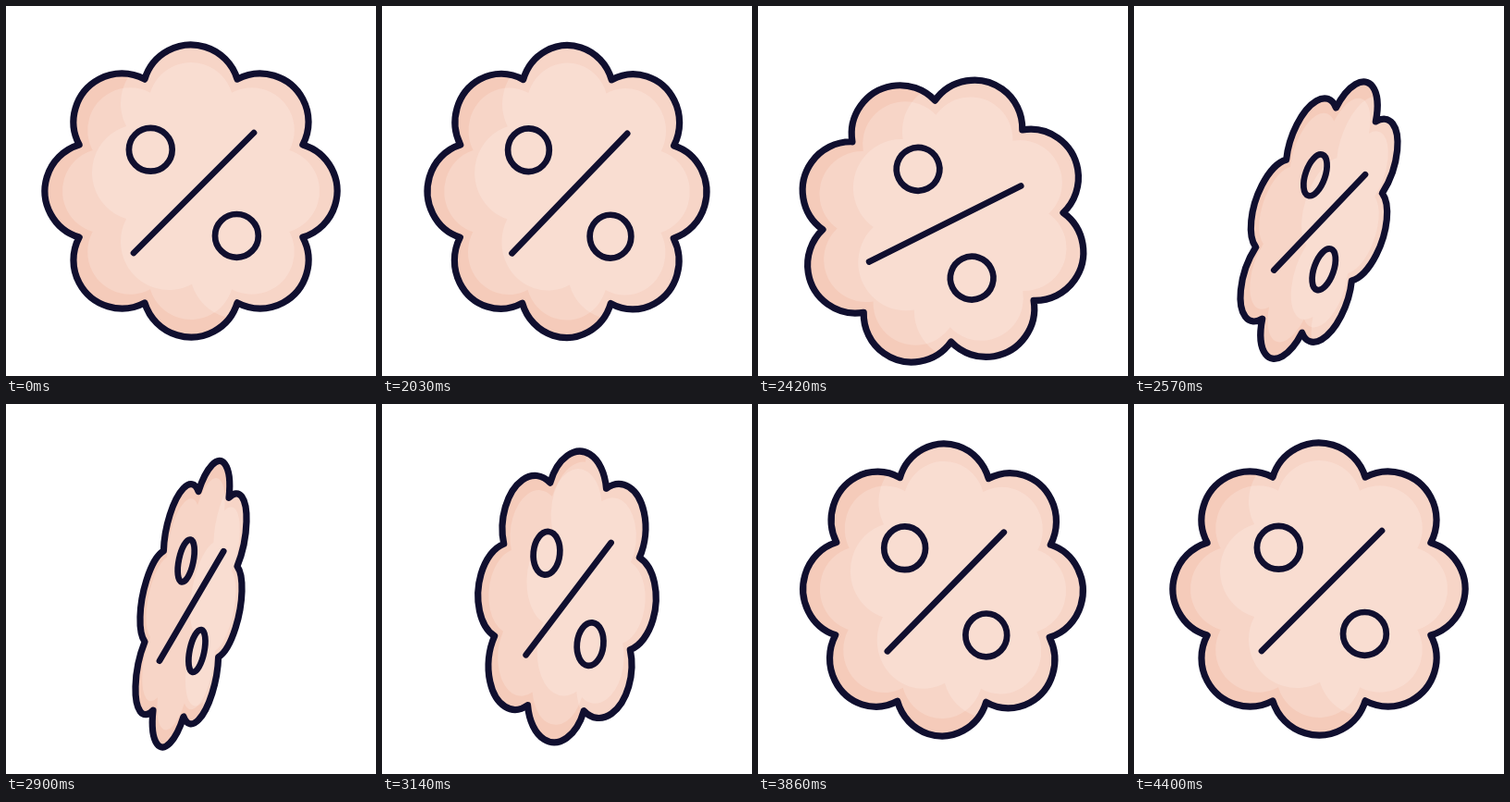
An HTML page with a canvas that plays this animation: 400x400 px, repeating every 4.43 s.

```html
<!DOCTYPE html>
<html lang="en">
<head>
<meta charset="utf-8">
<title>Spinning discount badge</title>
<style>
  html, body { margin: 0; width: 100%; height: 100%; overflow: hidden; background: #fff; }
  canvas { display: block; width: 400px; height: 400px; }
</style>
</head>
<body>
<canvas id="stage" width="400" height="400"></canvas>
<script>
const LOOP = 4430, START = 2000;
const INK = '#100f2f', SKIN = '#f5cbba', GLOW = 'rgba(255,255,255,.18)';
const ctx = document.getElementById('stage').getContext('2d');

// Cubic bezier easing with control points (x1, 0) and (x2, 1).
function ease(x, x1, x2) {
  if (x <= 0) return 0;
  if (x >= 1) return 1;
  let lo = 0, hi = 1;
  for (let i = 0; i < 30; i++) {
    const s = (lo + hi) / 2, r = 1 - s;
    if (3 * x1 * s * r * r + 3 * x2 * s * s * r + s * s * s < x) lo = s; else hi = s;
  }
  return lo * lo * (3 - 2 * lo);
}

// Rises to 1 at `peak`, then settles back to 0 at `end`.
const swing = (t, peak, end) => t < peak
  ? ease(t / peak, 1 / 3, 2 / 3)
  : 1 - ease((t - peak) / (end - peak), 1 / 3, 0);

// Horizontal scale: turns to the back, then around to the front again.
const turn = t => Math.abs(t < 405
  ? 1 - 2 * ease(t / 405, .27, .73)
  : 2 * ease((t - 405) / 1905, .105, 0) - 1);

function flower(scale = 1) {
  const path = new Path2D();
  const ring = 105.7 * scale, r = 52.3 * scale;
  const sweep = Math.PI / 8 + Math.asin(ring * Math.sin(Math.PI / 8) / r);
  for (let i = 0; i < 8; i++) {
    const a = i * Math.PI / 4;
    path.arc(ring * Math.cos(a), ring * Math.sin(a), r, a - sweep, a + sweep);
  }
  path.closePath();
  return path;
}

// A flower whose upper right side runs on past the badge.
function highlight() {
  const path = flower();
  path.addPath(new Path2D('M-75-140H300V190H0V106L-75-75Z'));
  return path;
}

function percent() {
  const path = new Path2D();
  path.moveTo(-62, 67);
  path.lineTo(68, -63);
  for (const [x, y] of [[-43.7, -44.7], [49.4, 48.4]]) {
    path.moveTo(x + 23.4, y);
    path.arc(x, y, 23.4, 0, 2 * Math.PI);
  }
  return path;
}

const badge = flower(), inner = flower(.88), shine = highlight(), sign = percent();

function posed(path, pose) {
  const result = new Path2D();
  result.addPath(path, pose);
  return result;
}

function draw(time) {
  const t = time % LOOP - START;
  const width = turn(t);
  const tilt = new DOMMatrix()
    .translate(200, 200 + 32.6 * swing(t, 400, 2400))
    .rotate(19.4 * swing(t, 480, 2400));
  const pose = tilt.scale(width, 1);
  // Paths are posed before stroking so that lines keep their weight.
  const body = posed(badge, pose);

  ctx.fillStyle = '#fff';
  ctx.fillRect(0, 0, 400, 400);
  ctx.save();
  ctx.clip(body);
  ctx.fillStyle = SKIN;
  ctx.fillRect(0, 0, 400, 400);
  ctx.fillStyle = GLOW;
  ctx.fill(posed(inner, pose));
  ctx.fill(posed(shine, tilt.translate(51, -20).scale(width, 1)));
  ctx.restore();

  ctx.strokeStyle = INK;
  ctx.lineCap = ctx.lineJoin = 'round';
  ctx.lineWidth = 7.2;
  ctx.stroke(body);
  ctx.lineWidth = 6.7;
  ctx.stroke(posed(sign, pose));
}

function tick() {
  draw(performance.now());
  requestAnimationFrame(tick);
}
tick();
</script>
</body>
</html>
```
